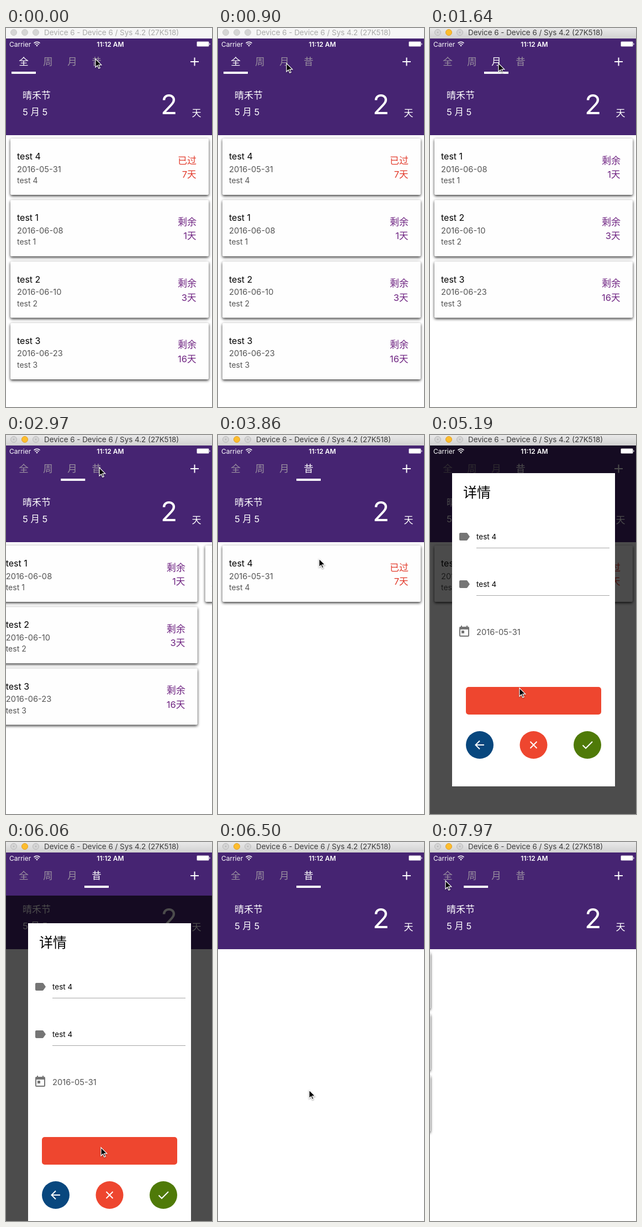
These frames come from a looping animation (373x686 px, 8 s). An HTML page:

```html
<!DOCTYPE html>
<html lang="zh-CN">
<head>
<meta charset="utf-8">
<title>Countdown list</title>
<style>
  html, body { margin: 0; width: 100%; height: 100%; overflow: hidden; background: #fff; }
  svg { display: block; width: 100vw; height: 100vh; font-family: Inter, "Noto Sans CJK SC", "Noto Sans CJK", sans-serif; }
  .card rect { fill: #fefefe; filter: drop-shadow(0 2px 2.5px rgba(0, 0, 0, .82)); }
  .line { fill: none; stroke: #fff; stroke-width: 2; }
</style>
</head>
<body>
<svg viewBox="0 0 373 686">
  <defs>
    <linearGradient id="chrome" x2="0" y2="1">
      <stop stop-color="#e9e9e9"/><stop offset="1" stop-color="#d1d1d1"/>
    </linearGradient>
    <path id="label" fill="#757575" d="M17.6 5.8C17.3 5.3 16.7 5 16 5H5a2 2 0 0 0-2 2v10a2 2 0 0 0 2 2h11c.7 0 1.3-.3 1.6-.8L22 12z"/>
  </defs>

  <g id="pages"></g>

  <g id="header">
    <rect y="19" width="373" height="175" fill="#462472"/>
    <g id="tabs" font-size="17.5" text-anchor="middle"></g>
    <rect id="underline" y="79" width="44" height="4" fill="#fff"/>
    <path class="line" d="M334 61h15M341.5 53.5v15"/>
    <g fill="#fff" font-size="17">
      <text x="30" y="128">晴禾节</text>
      <text x="30" y="158" font-size="16.5">5 月 5</text>
      <text x="295" y="156" font-size="49.5" text-anchor="middle">2</text>
      <text x="336.5" y="160">天</text>
    </g>
  </g>

  <g id="modal">
    <rect y="19" width="373" height="667" opacity=".7"/>
    <rect x="40" y="69" width="295" height="567" fill="#fff"/>
    <text x="60" y="113" font-size="25" font-weight="300">详情</text>
    <g id="fields" font-size="13.5"></g>
    <path fill="#757575" transform="translate(50 344)" fill-rule="evenodd"
      d="M19 3h-1V1h-2v2H8V1H6v2H5a2 2 0 0 0-2 2v14a2 2 0 0 0 2 2h14a2 2 0 0 0 2-2V5a2 2 0 0 0-2-2zM19 19H5V8h14zM7 10h5v5H7z"/>
    <text x="84" y="361.5" font-size="14.7" fill="#555">2016-05-31</text>
    <rect x="65" y="456" width="245" height="50" rx="5" fill="#ee462f"/>
    <g id="buttons"></g>
  </g>

  <g fill="#fff" font-size="12">
    <text x="6" y="33.5">Carrier</text>
    <text x="189" y="33.5" text-anchor="middle" font-weight="600">11:12 AM</text>
    <path class="line" style="stroke-width:1.6" d="M50.5 27.5a8 8 0 0 1 11 0M52.5 29.9a5 5 0 0 1 7 0"/>
    <path d="M54.2 31.7L56 33.6l1.8-1.9a2.6 2.6 0 0 0-3.6 0z"/>
    <rect x="345.5" y="24.5" width="22" height="9" rx="1.5" fill="none" stroke="#fff" stroke-opacity=".45"/>
    <rect x="346" y="25" width="21" height="8" rx="1"/>
    <rect x="368.3" y="27.5" width="1.2" height="3" rx=".6"/>
  </g>

  <rect id="titlebar" width="373" height="19"/>
  <g id="lights"></g>
  <text id="title" x="69" y="13" font-size="13.4">Device 6 - Device 6 / Sys 4.2 (27K518)</text>

  <path id="cursor" stroke="#fff" stroke-width="1.2" style="filter:drop-shadow(0 1px 1px rgba(0,0,0,.4))"
    d="M0 0V15l3.5-3.3 2.4 5.4 2.3-1-2.4-5.2h5z"/>
</svg>

<script>
const LOOP = 8000, PAGE = 373, TAB = 44, SHEET = 667;
const FOCUS = 1340, OPEN = 4250, DELETE = 6030;
const LAG = 12; // the tab underline trails the page scroll

const events = {
  1: ['2016-06-08', '剩余', '1天'],
  2: ['2016-06-10', '剩余', '3天'],
  3: ['2016-06-23', '剩余', '16天'],
  4: ['2016-05-31', '已过', '7天'],
};
const slides = [[1297, 0, 2], [2930, 2, 3], [7789.3, 3, 0]]; // start, from, to
const pointer = [ // time, x, y
  [0, 162, 56], [300, 162, 56], [747, 102, 67], [890, 124, 64],
  [2092, 124, 64], [2700, 165, 60], [3260, 174, 58], [3410, 173, 57],
  [3563, 173, 57], [3857, 183, 224], [4592, 183, 224], [5180, 162, 458],
  [5900, 172, 553], [6070, 172, 553], [6500, 165, 449],
  [7675, 25, 73], [7820, 28, 70], [LOOP, 28, 70],
];

const $ = id => document.getElementById(id);
const clamp = v => Math.min(1, Math.max(0, v));
const mix = (a, b, p) => a + (b - a) * p;
const ease = p => (1 - Math.cos(Math.PI * p)) / 2;
const move = (el, x, y) => el.setAttribute('transform', `translate(${x} ${y})`);

function card(id, row) {
  const [date, state, days] = events[id];
  const color = id === 4 ? '#e23b2c' : '#6f2482';
  return `<g class="card" transform="translate(0 ${200 + row * 111.3})">
    <rect x="8" width="359" height="102" rx="2"/>
    <text x="20" y="38" font-size="16">test ${id}</text>
    <g fill="#555"><text x="20" y="60.5" font-size="14.7">${date}</text>
    <text x="20" y="81" font-size="14">test ${id}</text></g>
    <g fill="${color}" text-anchor="end"><text x="345" y="45.5" font-size="17">${state}</text>
    <text x="344.5" y="71" font-size="16.5">${days}</text></g></g>`;
}

let shownDeleted;
function fillPages(deleted) {
  if (deleted === shownDeleted) return;
  shownDeleted = deleted;
  const rest = [1, 2, 3];
  const lists = [deleted ? rest : [4, ...rest], [], rest, deleted ? [] : [4]];
  $('pages').innerHTML = lists.map((list, i) =>
    `<g transform="translate(${i * PAGE} 0)">${list.map(card).join('')}</g>`).join('');
}

$('tabs').innerHTML = [...'全周月昔'].map((name, i) =>
  `<text x="${32 + i * TAB}" y="67">${name}</text>`).join('');
$('fields').innerHTML = [0, 86].map(y => `<g transform="translate(0 ${y})">
  <use href="#label" x="50" y="172"/><text x="84" y="189">test 4</text>
  <path d="M84 204.5h241" stroke="#a6a6a6"/></g>`).join('');
$('buttons').innerHTML = [
  [90, '#08477e', 'M20 12H5M12 4.5L4.5 12l7.5 7.5'],
  [187.5, '#ee462f', 'M6 6l12 12M18 6L6 18'],
  [285, '#4f7a08', 'M3.5 12.5l5.5 5.5L21 6'],
].map(([x, color, icon]) => `<circle cx="${x}" cy="561" r="25" fill="${color}"/>
  <path class="line" transform="translate(${x - 12} 549)" d="${icon}"/>`).join('');
$('lights').innerHTML = [14, 34, 54].map(x =>
  `<circle cx="${x}" cy="8" r="5.5"/><circle cx="${x}" cy="8" r="1.2" fill="#b5b5b5"/>`).join('');
const lights = $('lights').children;

function scrollAt(t) {
  let pos = 0;
  for (const [start, from, to] of slides)
    if (t >= start) pos = mix(from, to, ease(clamp((t - start) / 300)));
  return pos;
}

// Share of the way still to go for a critically damped spring
function spring(ms) {
  const x = Math.max(0, ms) * 0.01826;
  return (1 + x) * Math.exp(-x);
}

function pointerAt(t) {
  const i = pointer.findIndex(key => key[0] > t);
  const [t0, x0, y0] = pointer[i - 1], [t1, x1, y1] = pointer[i];
  const p = ease((t - t0) / (t1 - t0));
  return [mix(x0, x1, p), mix(y0, y1, p)];
}

// The screen refreshes about seven times a second
function sample(t) {
  return t < 2234 ? Math.floor((t + 6) / 149.33) * 149.33
                  : 2240 + Math.floor((t - 2234) / 147) * 147;
}

function draw(t) {
  fillPages(t >= DELETE);
  const pos = scrollAt(t), mark = scrollAt(t - LAG);
  move($('pages'), -pos * PAGE, 0);
  $('underline').setAttribute('x', 10 + mark * TAB);
  [...$('tabs').children].forEach((tab, i) => tab.setAttribute('fill', mark === i ? '#fff' : '#998f9f'));

  const drop = SHEET * (t < DELETE ? spring(t - OPEN) : 1 - spring(t - DELETE));
  $('modal').style.display = drop < SHEET - 3 ? '' : 'none';
  move($('modal'), 0, Math.round(drop));

  const focused = t >= FOCUS;
  $('titlebar').setAttribute('fill', focused ? 'url(#chrome)' : '#f6f6f6');
  $('title').setAttribute('fill', focused ? '#3a3a3a' : '#a9a9a9');
  for (let i = 0; i < 3; i++) {
    const lit = focused && i === 1;
    lights[i * 2].setAttribute('fill', lit ? '#fdbd2e' : '#d5d5d5');
    lights[i * 2].setAttribute('stroke', lit ? '#e0a028' : focused ? '#b9b9b9' : '#cacaca');
    lights[i * 2 + 1].style.display = focused && !lit ? '' : 'none';
  }
  move($('cursor'), ...pointerAt(t).map(Math.round));
}

const begin = performance.now();
function tick() {
  draw(sample((performance.now() - begin) % LOOP));
  requestAnimationFrame(tick);
}
tick();
</script>
</body>
</html>
```
